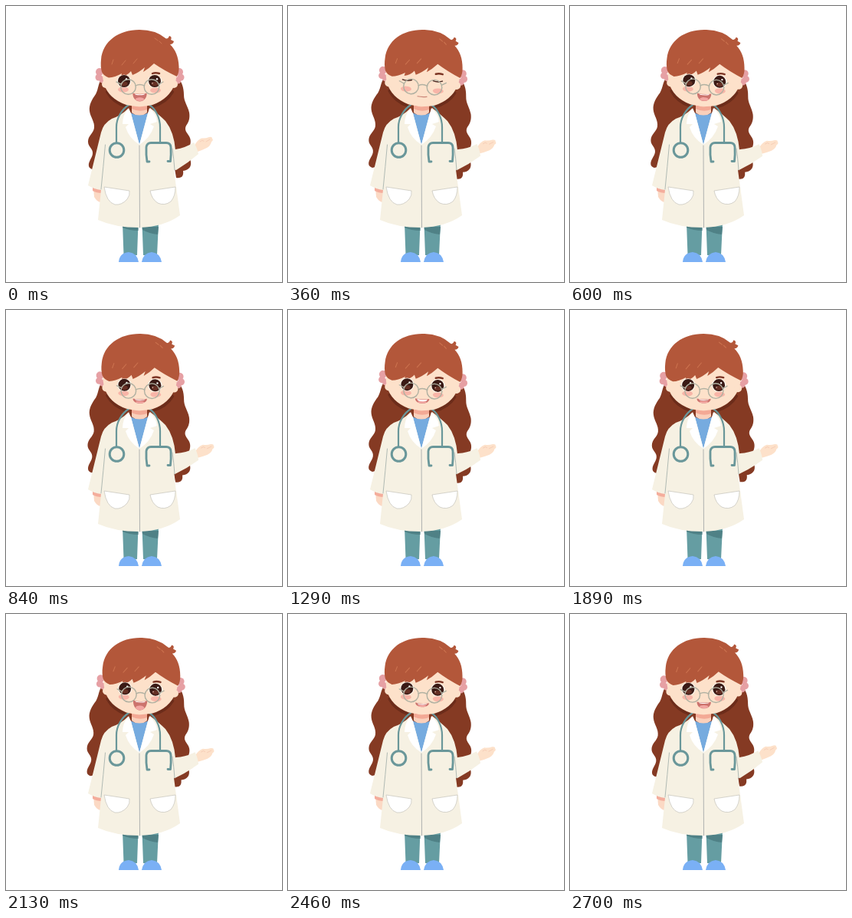
Animation, 360 px wide and 360 px high, one loop 2.79 s. Source, as an HTML page:

```html
<!DOCTYPE html>
<html lang="en">
<head>
<meta charset="utf-8">
<title>Waving doctor</title>
<style>
html, body { margin: 0; width: 100%; height: 100%; overflow: hidden; background: #fff; }
svg { display: block; width: 100vw; height: 100vh; }
.line { fill: none; stroke-linecap: round; stroke-linejoin: round; }
</style>
</head>
<body>
<svg viewBox="0 0 360 360">
  <g id="backHair">
    <path fill="#853a23" d="M126 94C120 99 121 108 117 115C112 122 108 129 109 137C110 145 116 151 115 159C114 166 107 169 107 177C107 184 114 186 113 193C112 199 107 203 108 209Q109 212 113 213L136 206L160 150H196L218 200L222 224C229 225 232 222 231 215C239 214 242 209 241 203C240 197 236 194 238 187C241 181 242 175 239 170C236 165 232 162 235 156C239 151 240 145 239 139C237 130 232 125 232 116C232 106 229 98 224 94Z"/>
    <path class="line" stroke="#6c2c1a" stroke-width="4" d="M132 112Q140 126 157 131M191 131Q209 126 217 112"/>
  </g>

  <g id="legs">
    <path fill="#659da2" d="M152 283H172.500L171 325H153.500ZM177.500 283H199L197 325H179Z"/>
    <path fill="#4f8186" d="M152 287H172.500V293Q161 293 152 289ZM177.500 288H199L198 298Q187 297 178 292Z"/>
    <path fill="#7ab0f5" d="M147 334Q148 322 160 321Q171 322 173 334ZM177 334Q179 322 190 321Q201 322 203 334Z"/>
  </g>

  <path fill="#fbd9c4" d="M114 236L125 238L124 256Q119 256 115 249Z"/>
  <path fill="#f4ad9c" d="M113 236L125 238V244Q118 244 113 241Z"/>

  <g id="arm">
    <path fill="#fde1ca" d="M246 182Q249 175 255 172.500Q260 173 265 171Q269 170 269 173Q271 175 268 177Q267 182 262 185Q256 188 250 190Z"/>
    <path class="line" stroke="#f3c5ae" stroke-width=".7" d="M253 177Q256 174 258 176M261 177L266 174"/>
    <path fill="#f6f1e3" d="M214 190L221 187Q234 185 245 178Q249 184 251 193Q237 205 222 214L214 213Z"/>
  </g>

  <path fill="#fad0bb" d="M164 122H184V139L174 146L164 139Z"/>
  <path fill="#f3a995" d="M164 128Q174 135 184 128V135Q174 139 164 134Z"/>
  <path fill="#76abdf" d="M162 139Q174 146 186 139L186 155L174 182L160 155Z"/>

  <path fill="#f6f1e3" d="M159 134Q150 143 138 147Q127 153 124 165L107 234Q115 239 124 240L120 279Q142 289 174 289Q206 288 227 273L219 214L221 188Q219 164 208 150Q200 142 188 133L185 140L174 181L163 140Z"/>
  <path fill="#fff" d="M160 133L163 140L174 181Q160 172 156 158L160 154L152 154Q152 142 160 133ZM187 133L185 140L174 181Q188 172 193 157L188 154L197 151Q196 141 187 133Z"/>
  <g class="line" stroke="#b7b6ae" stroke-width=".9">
    <path d="M174 182L174.500 289" stroke="#a7abab"/>
    <path d="M129.500 181Q127 209 124 239" stroke="#a9b4ae"/>
    <path d="M217 186Q219 199 220 214" stroke="#a9b4ae"/>
  </g>
  <path fill="#fff" stroke="#bbb9b0" stroke-width=".6" d="M128 236L161 241Q162 247 158 252Q151 260 142 259Q131 256 128 236ZM188 241L221 236Q221 248 215 255Q207 261 198 257Q190 252 188 241Z"/>

  <g class="line" stroke="#6a979a" stroke-width="2.200">
    <path d="M160 129C151 135 144 146 144 158V178M187 129C195 134 201 146 201 158V178"/>
    <circle cx="144.500" cy="188" r="9.300" stroke-width="3" fill="#f6f1e3"/>
    <path stroke-width="2.800" d="M187 203H184Q182.500 194 183 184Q184 178.500 189 178.500H209Q214.500 178.500 215 184Q215.500 194 214.500 202.500H211"/>
  </g>

  <g id="head">
    <g fill="#e6a0a4">
      <circle cx="122" cy="86" r="5"/><circle cx="121" cy="93" r="4.500"/><circle cx="126" cy="96" r="4.500"/>
      <circle cx="226" cy="86" r="5"/><circle cx="228" cy="93" r="4.500"/><circle cx="224" cy="97" r="4.500"/>
    </g>
    <path fill="#fde1ca" d="M126 80Q125 92 128 102Q134 121 157 129Q174 133 191 129Q213 121 220 102Q224 92 222 78L174 55Z"/>
    <circle cx="130" cy="102" r="5" fill="#fde1ca"/><circle cx="219" cy="102" r="5" fill="#fde1ca"/>
    <g fill="#f8b5a8"><ellipse cx="153" cy="109" rx="7" ry="3.500"/><ellipse cx="195" cy="110" rx="7" ry="3.500"/></g>
    <path fill="#b3573a" d="M134 93.500Q127 91 125 86Q123 79 124 70C126 46 147 31 174 31Q195 31 208 42Q211 44 213 39Q217 40 215 44L219 46Q218 50 214 50C221 57 225 66 225.500 79Q226 86 223 92Q206 84 193 75Q186 82 179 86L181 80Q173 87 165 90L163 85Q158 91 150 92L151 88Q142 93 134 93.500Z"/>
    <g id="eyes"></g>
    <g class="line" stroke="#b0b1a2" stroke-width="1.400">
      <circle cx="159.500" cy="105.500" r="9.800"/><circle cx="190" cy="105.500" r="9.800"/>
      <path d="M169 104Q174.500 101 180.500 104M150 102L144 99M199.500 102L205 99"/>
    </g>
    <g id="mouth"></g>
    <g class="line" stroke="#cd7450" stroke-width="1">
      <path d="M138 76L140 70M151 77L156 71M166 75L171 69M194 42L198 45M200 46L203 49"/>
    </g>
    <path class="line" stroke="#7c3524" stroke-width="2.400" d="M191 88Q195 86.500 200 88"/>
  </g>
</svg>
<script>
const LOOP = 2790, SWAY = LOOP / 3, BLINK = LOOP / 2;
const ticks = [0, 30, 150, 240, 360, 480, 600, 720, 840, 960, 1080, 1170, 1290,
  1410, 1530, 1650, 1770, 1890, 2010, 2130, 2250, 2340, 2460, 2580, 2700];
// time, opening, amount of teeth
const talk = [[0, .85, 0], [360, 0, 0], [600, .8, 0], [840, .5, 0], [1080, .8, 0],
  [1290, .5, 1], [1530, .55, .8], [1770, .3, 0], [2130, 1, 0], [2400, .4, 0], [2700, .7, 0], [2790, .85, 0]];

const el = id => document.getElementById(id);
const clamp = x => Math.max(0, Math.min(1, x));
const ease = x => { x = clamp(x); return x * x * (3 - 2 * x); };
const mix = (a, b, k) => a + (b - a) * k;
const turn = (id, deg, x, y) => el(id).setAttribute('transform', `rotate(${deg} ${x} ${y})`);

function eye(x, shut) {
  const y = 98, ry = 8 * (1 - shut);
  if (shut > .85) return `<path class="line" stroke="#45231d" stroke-width="1.500" d="M${x - 6} ${y - 1}Q${x} ${y + 1} ${x + 6} ${y - 1}"/>`;
  return `<ellipse cx="${x}" cy="${y}" rx="9.300" ry="${ry + .6}" fill="#fffaf2"/>
    <ellipse cx="${x}" cy="${y}" rx="8" ry="${ry}" fill="#3a1a15"/>
    <ellipse cx="${x}" cy="${y + ry * .45}" rx="4.500" ry="${ry * .35}" fill="#652f24"/>
    <circle cx="${x + 3}" cy="${y - ry * .35}" r="1.200" fill="#fff"/>
    <circle cx="${x - 3}" cy="${y + ry * .35}" r=".7" fill="#f6d9cd"/>`;
}

function mouth(open, teeth) {
  const x = 174.5, top = 118 - 5 * open, h = 12.5 * open, w = 7 + 2.2 * Math.min(1, open * 2);
  if (open < .08) return `<path class="line" stroke="#c98678" stroke-width="1.200" d="M${x - 6} 118Q${x} 119 ${x + 6} 118"/>`;
  const deep = top + h / .75;
  return `<path fill="#cc736d" d="M${x - w} ${top}Q${x} ${top + 2} ${x + w} ${top}C${x + w} ${deep} ${x - w} ${deep} ${x - w} ${top}Z"/>
    <ellipse cx="${x}" cy="${top + h * .74}" rx="${w * .62}" ry="${h * .23}" fill="#f2a6a2"/>
    <path fill="#fff" d="M${x - w * .75} ${top + .8}Q${x} ${top + 2} ${x + w * .75} ${top + .8}L${x + w * .6} ${top + 2 + teeth}Q${x} ${top + 3 + teeth * 1.2} ${x - w * .6} ${top + 2 + teeth}Z"/>`;
}

function draw(t) {
  const sway = Math.sin(Math.PI * (t % SWAY) / SWAY);
  turn('head', 2.6 * sway, 174, 130);
  turn('backHair', 2 * sway, 174, 125);

  const drop = ease(t / 450) * (1 - .9 * ease((t - 2250) / 450));
  turn('arm', 5 * drop, 220, 196);

  const b = t % BLINK;
  const shut = clamp((b - 85) / 155) * (1 - clamp((b - 370) / 110));
  el('eyes').innerHTML = eye(154, shut) + eye(194, shut);

  const i = talk.findIndex(k => k[0] > t), a = talk[i - 1], c = talk[i];
  const k = ease((t - a[0]) / (c[0] - a[0]));
  el('mouth').innerHTML = mouth(mix(a[1], c[1], k), mix(a[2], c[2], k));
}

let shown = -1;
function frame() {
  const now = performance.now() % LOOP;
  const t = ticks.filter(x => x <= now).pop();
  if (t !== shown) draw(shown = t);
  requestAnimationFrame(frame);
}
frame();
</script>
</body>
</html>
```
